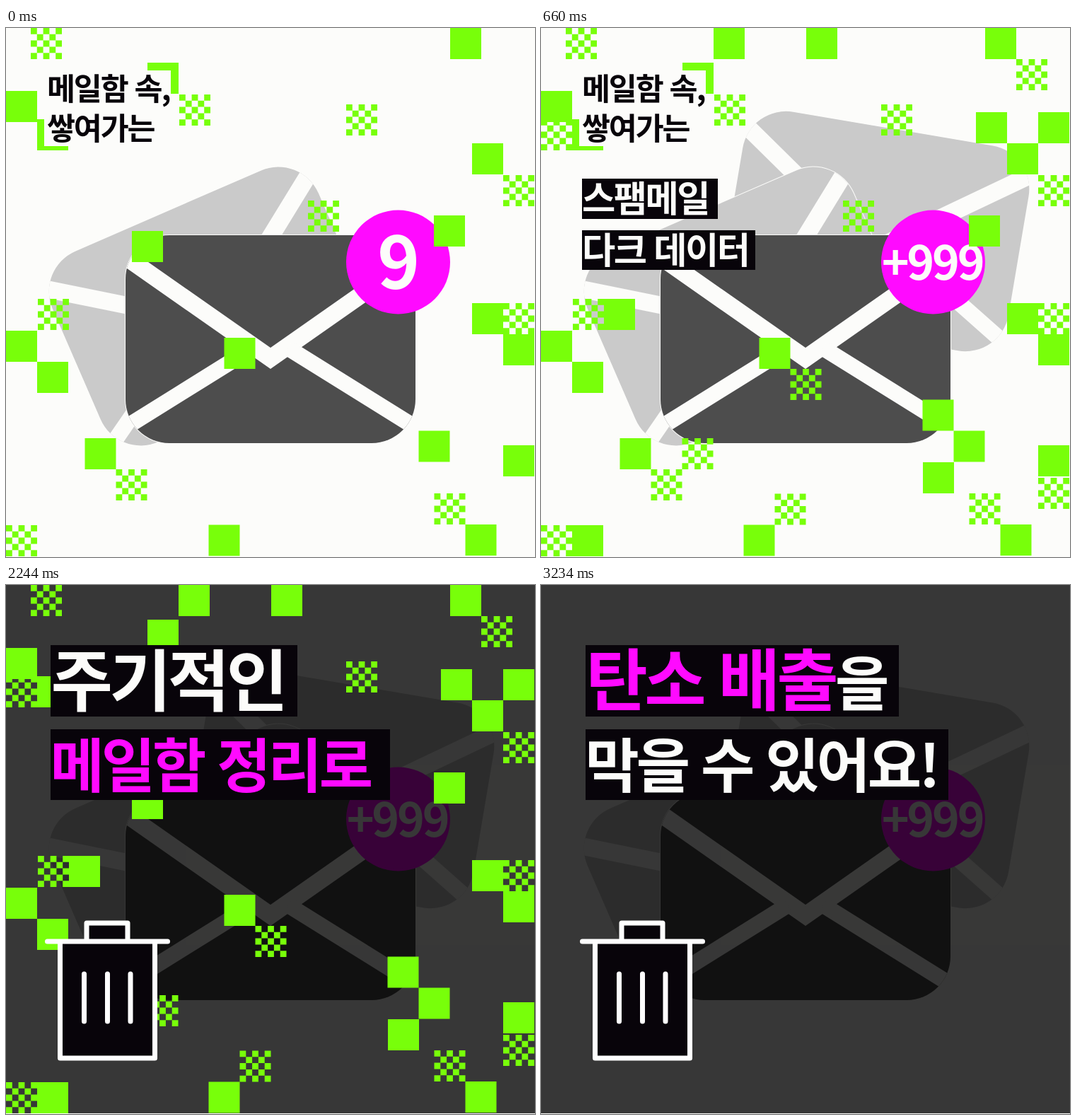
An HTML page that plays this animation: 748 by 748 pixels, repeating every 3.63 s.

```html
<!DOCTYPE html>
<html lang="ko">
<head>
<meta charset="utf-8">
<title>메일함 정리</title>
<style>
  html, body { margin: 0; width: 100%; height: 100%; overflow: hidden; background: #fcfcfa; }
  svg { display: block; width: 100%; height: 100%; }
  text {
    font-family: "Noto Sans CJK KR", "Noto Sans CJK", sans-serif;
    font-weight: 700;
    letter-spacing: -.05em;
  }

  .paper { fill: #fcfcfa; }
  .ink { fill: #08040a; }
  .pink { fill: #ff0aff; }
  .lime { fill: #78ff0a; }
  .small { font-size: 43.5px; }
  .medium { font-size: 51.4px; }
  .large { font-size: 83px; }
  .huge { font-size: 95px; }
  .count { text-anchor: middle; }
  .seams { fill: none; stroke: #fcfcfa; }
  .bin { fill: #08040a; stroke: #fff; stroke-width: 7; stroke-linecap: round; stroke-linejoin: round; }

  /* The loop has eleven beats of 330 ms; parts appear and vanish on beats 1, 2, 5 and 8. */
  .timed {
    --from: none; --until: none;
    animation: 3630ms step-end infinite;
    animation-name: var(--from), var(--until);
  }
  .from1 { --from: from1; } .from2 { --from: from2; }
  .from5 { --from: from5; } .from8 { --from: from8; }
  .until1 { --until: until1; } .until2 { --until: until2; }
  .until5 { --until: until5; } .until8 { --until: until8; }
  @keyframes from1 { 0% { visibility: hidden; } 9.0909% { visibility: visible; } }
  @keyframes from2 { 0% { visibility: hidden; } 18.1818% { visibility: visible; } }
  @keyframes from5 { 0% { visibility: hidden; } 45.4545% { visibility: visible; } }
  @keyframes from8 { 0% { visibility: hidden; } 72.7273% { visibility: visible; } }
  @keyframes until1 { 0% { opacity: 1; } 9.0909% { opacity: 0; } }
  @keyframes until2 { 0% { opacity: 1; } 18.1818% { opacity: 0; } }
  @keyframes until5 { 0% { opacity: 1; } 45.4545% { opacity: 0; } }
  @keyframes until8 { 0% { opacity: 1; } 72.7273% { opacity: 0; } }
</style>
</head>
<body>
<svg viewBox="0 0 748 748">
  <defs>
    <clipPath id="body"><rect width="410" height="294" rx="62"/></clipPath>
    <g id="envelope">
      <rect x="-1" y="-1" width="412" height="296" rx="63" class="paper"/>
      <rect width="410" height="294" rx="62" fill="currentColor"/>
      <g class="seams" clip-path="url(#body)">
        <path d="M-20 16.5 205 174 430 16.5" stroke-width="24.6"/>
        <path d="M-20 284.3 180 159.6M430 284.3 230 159.6" stroke-width="22.5"/>
      </g>
    </g>
  </defs>

  <rect width="748" height="748" class="paper"/>
  <g class="timed from1" color="#cacaca">
    <use href="#envelope" transform="translate(295.6 108.4) rotate(9.6)"/>
  </g>
  <use href="#envelope" color="#cacaca" transform="translate(41.2 340.4) rotate(-23.5)"/>
  <use href="#envelope" color="#4d4d4d" transform="translate(169 293)"/>

  <circle cx="554.5" cy="331" r="73.5" class="pink"/>
  <g class="paper">
    <text class="count timed until1" x="552.5" y="369" font-size="102">9</text>
    <text class="count timed from1 until2" x="553" y="366" font-size="88">99</text>
    <text class="count timed from2" x="553" y="356" font-size="66">+999</text>
  </g>

  <rect class="timed from5" width="748" height="747" fill="#000" fill-opacity=".78"/>

  <g class="lime">
    <path class="tiles timed until8"/>
    <path class="tiles timed from1 until8"/>
    <path class="tiles timed from2 until8"/>
  </g>

  <g class="timed until5">
    <rect x="54" y="60" width="179" height="107" class="paper"/>
    <text class="small ink" x="58" y="102">메일함 속,</text>
    <text class="small ink" x="58" y="157.500">쌓여가는</text>
  </g>
  <g class="timed from1 until5">
    <rect x="58" y="213" width="192" height="57" class="ink"/>
    <text class="medium paper" x="58" y="260">스팸메일</text>
  </g>
  <g class="timed from2 until5">
    <rect x="58" y="286" width="245" height="56" class="ink"/>
    <text class="medium paper" x="58" y="332.500">다크 데이터</text>
  </g>

  <g class="timed from5 until8">
    <path class="ink" d="M63 85h349v101h-349zM63 204h480v100h-480z"/>
    <text class="huge paper" x="63.500" y="170.500">주기적인</text>
    <text class="large pink" x="62.500" y="285.500">메일함 정리로</text>
  </g>
  <g class="timed from8">
    <path class="ink" d="M63 85h443v101h-443zM63 204h513v100h-513z"/>
    <text class="huge pink" x="63.500" y="170">탄소 배출<tspan class="large paper">을</tspan></text>
    <text class="large paper" x="62.500" y="285.500">막을 수 있어요!</text>
  </g>

  <g class="bin timed from5">
    <path d="M114 504v-26h58v26zM76.500 504v165h134v-165zM58.500 504h170"/>
    <path d="M110.500 550v67M143.500 550v67M176 550v67"/>
  </g>
</svg>
<script>
  const SIZE = 44, CELL = SIZE / 5;
  const layers = ['', '', ''];

  const block = (x, y, size = SIZE) => `M${x} ${y}h${size}v${size}h${-size}z`;

  function checker(x, y) {
    let path = '';
    for (let i = 0; i < 25; i += 2) {
      path += block(x + (i % 5) * CELL, y + Math.floor(i / 5) * CELL, CELL);
    }
    return path;
  }

  // Tiles run rightwards, every second one shifted by `drop` tiles.
  // "#" is solid, "%" is checked; the digit is the beat on which the tile appears.
  function zigzag(tiles, x, y, drop = 1) {
    tiles.split(' ').forEach(([shape, beat], i) => {
      const draw = shape === '#' ? block : checker;
      layers[beat] += draw(x + i * SIZE, y + (i % 2) * drop * SIZE);
    });
  }

  // Corners and edges
  zigzag('%0', 35, 0);
  zigzag('#2', 244, 0);
  zigzag('#0', 200, 49);
  zigzag('#1', 375, 0);
  zigzag('#0 %1', 628, 0);
  zigzag('#0', 0, 89);
  zigzag('%2 #0', 0, 129, 0);
  zigzag('%0 #2', 0, 703, 0);
  zigzag('#0 %2', 286.5, 702.5, -1);
  zigzag('%0 #0', 605.5, 658);

  // Left and middle
  zigzag('%0', 245, 94);
  zigzag('%0', 481, 108);
  zigzag('%0', 427, 244);
  zigzag('#0', 178, 287);
  zigzag('%0 #2', 45, 383, 0);
  zigzag('#0 #0', 0, 428);
  zigzag('#0 %1', 308.5, 438);
  zigzag('#0 %0 %1', 111.5, 580);

  // Right
  zigzag('#2 #0 #2', 615, 119);
  zigzag('%0', 703, 208);
  zigzag('#0', 605, 265);
  zigzag('#0 #0', 659, 389);
  zigzag('%0', 703, 389);
  zigzag('#1 #0', 539.5, 525.5);
  zigzag('#2', 540, 614);
  zigzag('#0', 703, 590);
  zigzag('%1', 703, 636);

  document.querySelectorAll('.tiles').forEach((path, beat) => path.setAttribute('d', layers[beat]));
</script>
</body>
</html>
```
